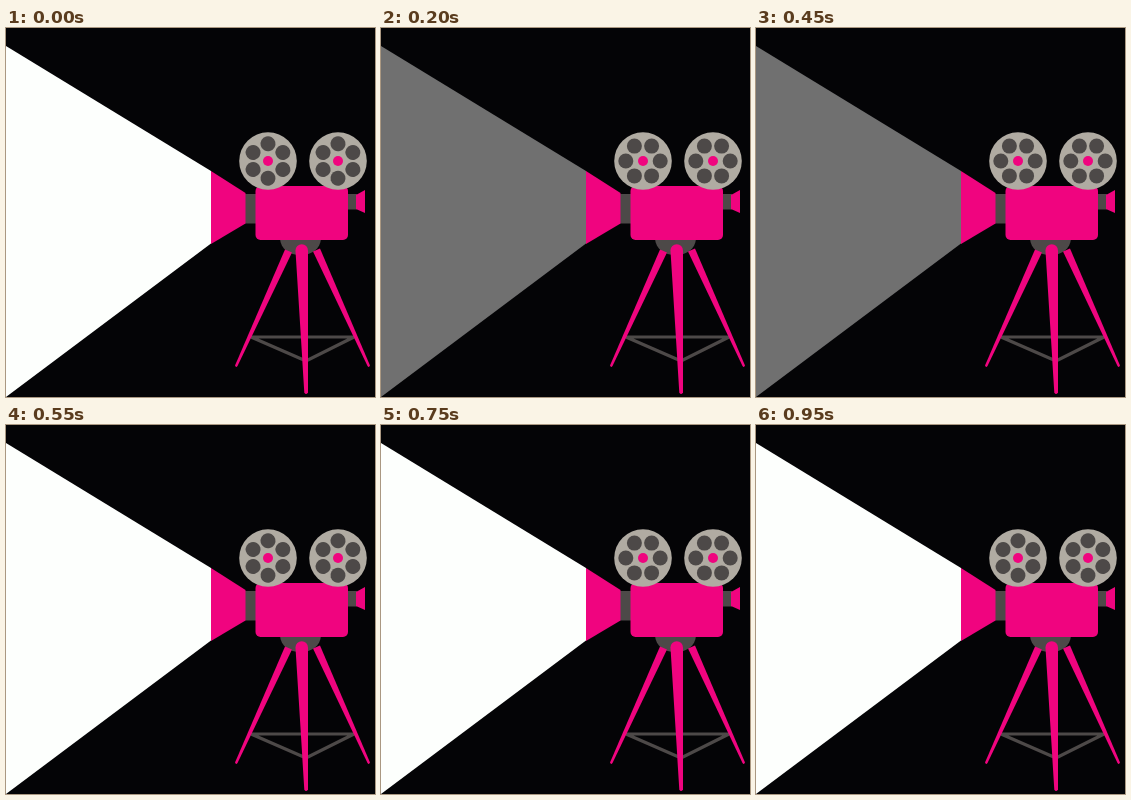
An HTML page for the animation above (1000 ms loop, 369 by 369 pixels).

```html
<!DOCTYPE html>
<html lang="en">
<head>
<meta charset="utf-8">
<title>Film projector</title>
<style>
  html, body { margin: 0; width: 100%; height: 100%; overflow: hidden; background: #040406; }
  svg { display: block; width: 100%; height: 100%; }
  .pink { fill: #f0047f; }
  .dark { fill: #4d4948; }
  .metal { fill: #b0aba2; }
</style>
</head>
<body>
<svg viewBox="0 0 369 369">
  <defs>
    <g id="holes" class="dark"></g>
  </defs>
  <rect width="369" height="369" fill="#040406"/>
  <path id="beam" d="M0 18L205 143V215.5L0 369Z"/>

  <!-- tripod -->
  <path d="M245 309H348L300 333Z" fill="none" stroke="#4d4948" stroke-width="3.2"/>
  <path class="dark" d="M274 211H315C314 221 306 227 294.500 227S275 221 274 211Z"/>
  <g class="pink">
    <path d="M279 221.500L286 224.500L231.500 338Q230 340 229 337.500Z"/>
    <path d="M307 223.500L314 220.500L364 337.500Q363 340 361.500 338Z"/>
    <path d="M289.500 222.500A6.200 6.200 0 0 1 302 222.500L302 364.500Q300 367.500 298.300 364.500Z"/>
  </g>

  <!-- camera -->
  <rect class="dark" x="238" y="166" width="13" height="29.500"/>
  <rect class="dark" x="341" y="166" width="10" height="15.500"/>
  <g class="pink">
    <path d="M205 143L239.500 165V195.500L205 216Z"/>
    <path d="M350 167L359 162V185L350 181Z"/>
    <rect x="249.500" y="158" width="92.500" height="54" rx="5"/>
  </g>
  <g id="reels"></g>
</svg>
<script>
  const LOOP = 1000, STEP = 50;
  const beamFlips = [2, 5, 7, 10, 12, 14, 17, 19];
  const reelHolds = [2, 7, 10, 14, 19];
  const beam = document.getElementById('beam');

  const circle = (x, y, r, cls) =>
    `<circle cx="${x}" cy="${y}" r="${r}" class="${cls}"/>`;

  const holes = Array.from({ length: 6 }, (_, i) => {
    const a = i * Math.PI / 3;
    return circle(17.2 * Math.cos(a), 17.2 * Math.sin(a), 7.5, 'dark');
  }).join('');

  document.getElementById('reels').innerHTML = [262, 332].map(x =>
    `<g transform="translate(${x} 133)">${circle(0, 0, 28.8, 'metal')}` +
    `<g class="spin">${holes}</g>${circle(0, 0, 5, 'pink')}</g>`).join('');
  const spins = document.querySelectorAll('.spin');

  const countUpTo = (list, k) => list.filter(n => n <= k).length;

  function draw(time) {
    const k = Math.floor((time % LOOP) / STEP);
    const dim = countUpTo(beamFlips, k) % 2;
    // The reels flip on every step except the held ones.
    const turns = k - countUpTo(reelHolds, k);
    const angle = turns % 2 ? 0 : 30;
    beam.setAttribute('fill', dim ? '#707070' : '#fdfffd');
    spins.forEach(s => s.setAttribute('transform', `rotate(${angle})`));
  }

  const start = performance.now();
  function tick() {
    draw(performance.now() - start);
    requestAnimationFrame(tick);
  }
  tick();
</script>
</body>
</html>
```
